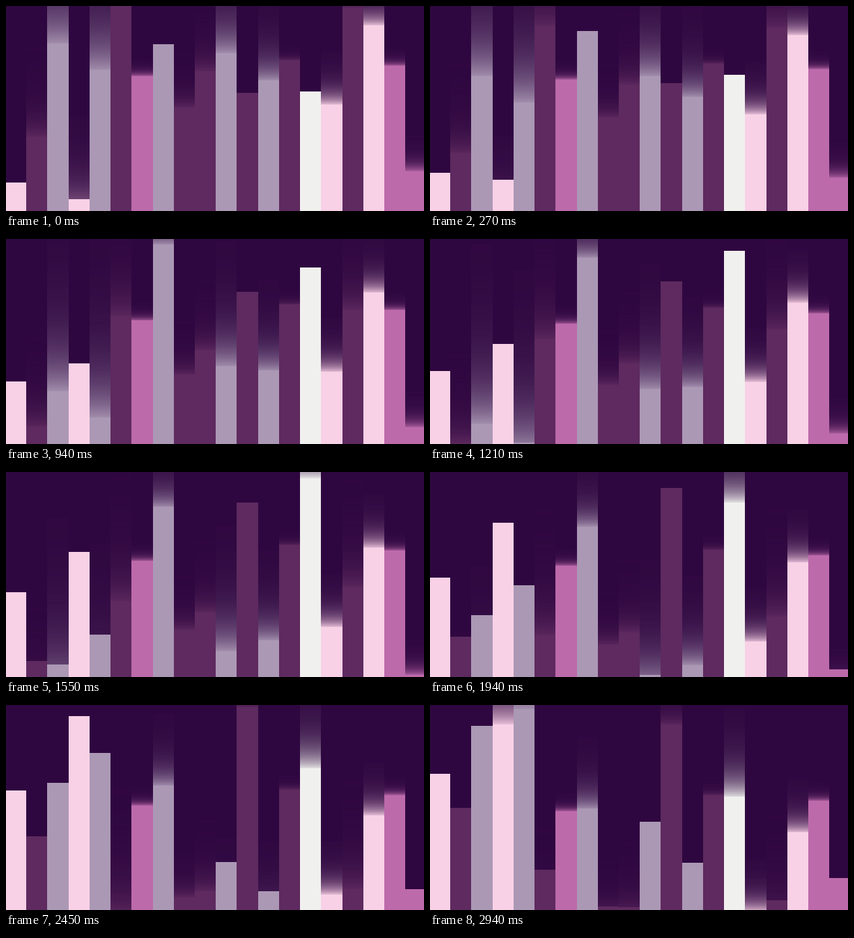
An HTML page with a canvas for the animation above (3000 ms loop, 600x295 px).

```html
<!DOCTYPE html>
<html lang="en">
<head>
<meta charset="utf-8">
<title>Bouncing bars</title>
<style>
  html, body { margin: 0; width: 100%; height: 100%; overflow: hidden; background: #2f0740; }
  canvas { display: block; }
</style>
</head>
<body>
<canvas id="stage" width="600" height="295"></canvas>
<script>
const W = 600, H = 295;
const FRAMES = 45, LOOP = 3000;
const UNIT = 1.178;   // pixels per step at speed 1
const FADE = 4.6;     // steps for a trail to drop to 1/e
const BG = '#2f0740';
const PINK = '#f9d1e6', PLUM = '#5e2a5f', LILAC = '#ab98b5', ORCHID = '#bd6aab', WHITE = '#f0f0ee';

// colour, speed (negative while growing), top edge at the start, overshoot below the floor
const bars = [
  [PINK, -3, 254, 1], [PLUM, 5, 188, 2.7], [LILAC, 10, 54, 6], [PINK, -6, 278, 1],
  [LILAC, 10, 92, 3.3], [PLUM, 7, -4, 2.9], [ORCHID, 1, 101, 0], [LILAC, -4, 55, 1],
  [PLUM, 3, 146, 0.7], [PLUM, 4, 94, 1], [LILAC, 7, 68, 4.6], [PLUM, -3, 125, 1],
  [LILAC, 5, 107, 1.5], [PLUM, 1, 78, 0], [WHITE, -5, 123, 1], [PINK, 3, 142, 1],
  [PLUM, 6, 3, 2.5], [PINK, 3, 28, 1], [ORCHID, 1, 86, 0], [ORCHID, 2, 238, 0.2]
];

const ctx = document.getElementById('stage').getContext('2d');
const barX = i => Math.round(30.22 * i - 1);

// Steps last 60 ms, with a longer one in every five.
function stepAt(ms) {
  let step = 0;
  while (step < FRAMES - 1) {
    ms -= step % 5 !== 2 ? 60 : step % 15 === 7 ? 100 : 90;
    if (ms < 0) break;
    step++;
  }
  return step;
}

function drawBar([color, speed, start, over], i, step) {
  const v = Math.abs(speed) * UNIT;
  const top = -v / 3, span = H + over - top;
  const begin = speed > 0 ? start - top : 2 * span - (start - top);
  const s = (begin + v * step) % (2 * span);
  const edge = Math.round(top + (s < span ? s : 2 * span - s));
  const x = barX(i), w = barX(i + 1) - x;

  ctx.fillStyle = color;
  ctx.fillRect(x, edge, w, H - edge);

  // Each row above the edge fades from the moment the falling bar left it.
  for (let y = Math.min(edge, H) - 1; y >= 0; y--) {
    const age = Math.max(0, (top + s - y) / v);
    if (age > 22) break;
    ctx.globalAlpha = Math.exp(-(age + 0.3) / FADE);
    ctx.fillRect(x, y, w, 1);
  }
  ctx.globalAlpha = 1;
}

const t0 = performance.now();

function draw(now) {
  const step = stepAt(Math.max(0, now - t0) % LOOP);
  ctx.fillStyle = BG;
  ctx.fillRect(0, 0, W, H);
  bars.forEach((bar, i) => drawBar(bar, i, step));
  requestAnimationFrame(draw);
}
draw(t0);
</script>
</body>
</html>
```
